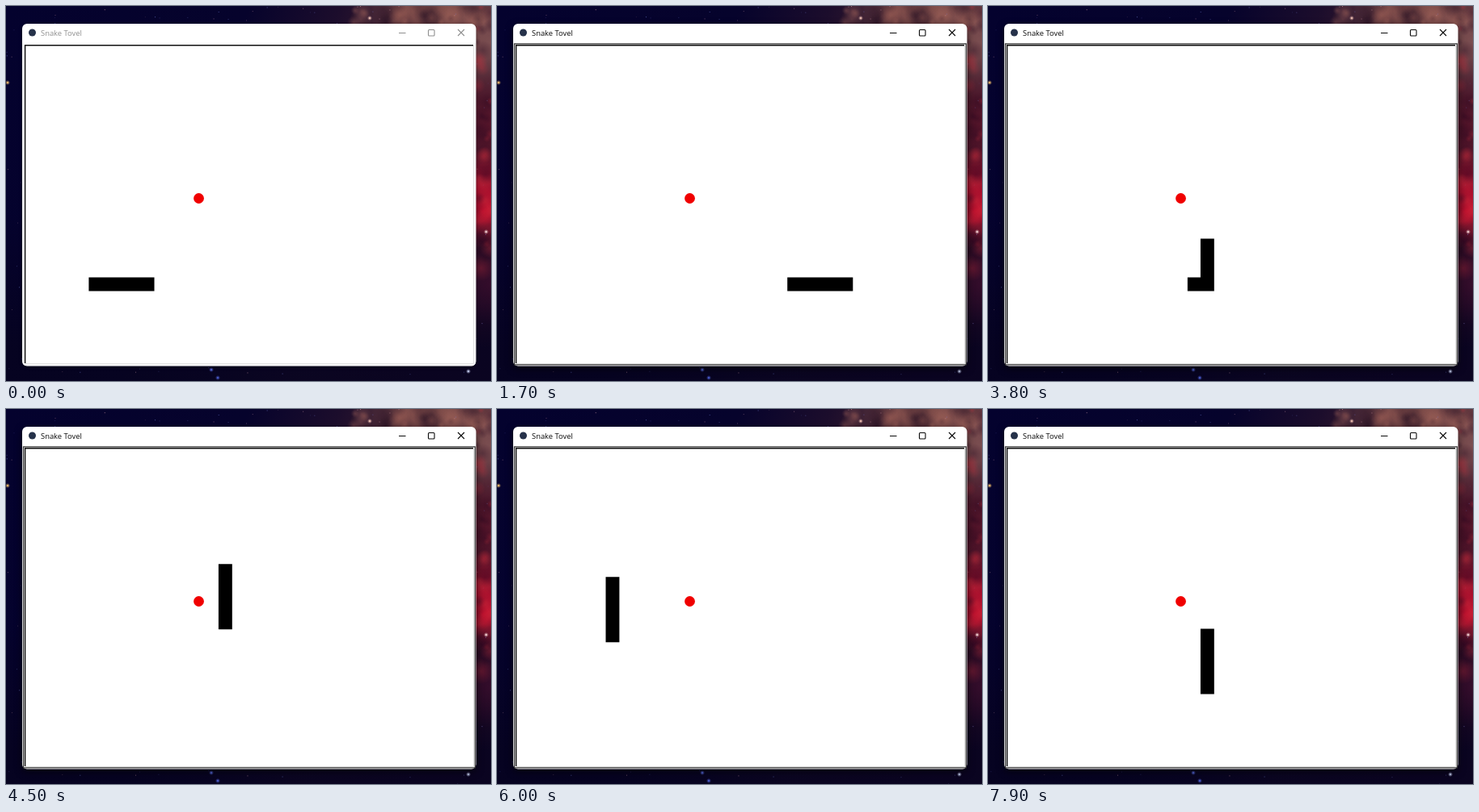
An HTML page with a canvas that plays this animation: 600x465 px, repeating every 8000 ms.

```html
<!DOCTYPE html>
<html lang="en">
<head>
<meta charset="utf-8">
<title>Snake</title>
<style>
  html, body { margin: 0; width: 100%; height: 100%; overflow: hidden; background: #03022c; }
  canvas, svg { position: absolute; left: 0; top: 0; display: block; }
  text { font: 9.4px "Open Sans", "Noto Sans", sans-serif; }
  #win { --ink: #8f8f8f; filter: drop-shadow(0 1px 2px #0006); }
  #win.focused { --ink: #0a0a0a; filter: drop-shadow(0 3px 5px #0009); }
  #focusRing { display: none; }
  .focused #focusRing { display: inline; }
</style>
</head>
<body>
<canvas id="sky" width="600" height="465"></canvas>
<svg width="600" height="465" viewBox="0 0 600 465">
  <g id="win">
    <rect x="20" y="22" width="561.5" height="424.5" rx="6" fill="#fff"/>
    <path d="M20.5 46H581V441q0 5-5 5H25.500q-5 0-5-5z" fill="#f4f4f4"/>
    <rect x="22" y="47" width="558" height="397.500" fill="#fff"/>
    <circle cx="32.500" cy="33" r="4.500" fill="#26324a"/>
    <text x="43" y="36.900" fill="var(--ink)">Snake Tovel</text>
    <g fill="none" stroke="var(--ink)" stroke-width="1.100">
      <path d="M486 33.500h8.500M559 29l8 8m0-8l-8 8"/>
      <rect x="522.500" y="29.500" width="7.500" height="7.500" rx="1"/>
    </g>
    <path d="M578.500 49V443.500H24" fill="none" stroke="#e2e2e2"/>
    <path d="M578 48.800H23.600V443" fill="none" stroke="#111" stroke-width="1.500"/>
    <path id="focusRing" d="M21.500 46.800H580.300V444.900H21.500z" fill="none" stroke="#333" stroke-width="1.200"/>
  </g>
  <circle cx="238.500" cy="238.500" r="6.400" fill="#f00000"/>
  <path id="snake"/>
  <g id="mouse">
    <circle r="23.500" fill="#ff0"/>
    <path d="M.5 .5V12.500L3.300 10l2.200 4.500 2.200-1-2-4.300H9.300z" fill="#24101e" stroke="#53203a" stroke-width=".6"/>
  </g>
</svg>
<script>
const $ = id => document.getElementById(id);
const TICK = 100, LOOP = 8000, LENGTH = 5, COLUMNS = 25, FOCUS_TICK = 12;

function paintSky() {
  const c = $('sky').getContext('2d');
  const glow = (x, y, r, rgb, alpha) => {
    const g = c.createRadialGradient(x, y, 0, x, y, r);
    g.addColorStop(0, `rgba(${rgb},${alpha})`);
    g.addColorStop(1, `rgba(${rgb},0)`);
    c.fillStyle = g;
    c.fillRect(x - r, y - r, 2 * r, 2 * r);
  };
  const base = c.createLinearGradient(0, 0, 600, 200);
  [[0, '#04022e'], [.45, '#06032c'], [.62, '#1c0d2c'], [.78, '#42202f'], [1, '#3a1026']]
    .forEach(([at, color]) => base.addColorStop(at, color));
  c.fillStyle = base;
  c.fillRect(0, 0, 600, 465);
  const depth = c.createLinearGradient(0, 260, 0, 465);
  depth.addColorStop(0, 'rgba(6,3,32,0)');
  depth.addColorStop(.8, 'rgba(6,3,32,.92)');
  c.fillStyle = depth;
  c.fillRect(0, 260, 600, 205);

  let seed = 7;
  const random = () => (seed = seed * 16807 % 2147483647) / 2147483647;
  glow(535, 0, 110, '150,95,85', .75);
  glow(600, 45, 75, '150,105,100', .6);
  glow(592, 150, 70, '120,25,45', .5);
  glow(592, 240, 60, '215,10,45', .85);
  glow(590, 255, 18, '255,20,50', .6);
  glow(600, 345, 50, '70,15,50', .5);
  for (let i = 0; i < 45; i++)
    glow(430 + random() * 170, random() * 22, 4 + random() * 14, i % 2 ? '30,10,30' : '180,110,95', .3);
  for (let i = 0; i < 50; i++)
    glow(582 + random() * 18, random() * 330, 4 + random() * 12, i % 2 ? '35,5,30' : '200,45,60', .3);
  for (let i = 0; i < 420; i++) {
    c.fillStyle = `rgba(${i % 3 ? '120,130,220' : '230,170,180'},${.12 + random() * .5})`;
    c.fillRect(random() * 600, random() * 465, 1, 1);
  }
  [[2, 95, '255,200,110'], [572, 453, '210,220,255'], [254, 451, '90,110,230'],
   [594, 280, '255,225,225'], [450, 15, '255,205,190'], [262, 461, '80,100,220']]
    .forEach(([x, y, rgb]) => { glow(x, y, 3, rgb, .9); glow(x, y, 1.5, rgb, 1); });
}

// Route of the head as legs of [dx, dy, cells]; it wraps at the right edge.
const route = [[0, 0]];
for (const [dx, dy, cells] of [[1, 0, 35], [0, -1, 9], [-1, 0, 8], [0, 1, 9], [1, 0, 8], [0, -1, 9]])
  for (let i = 0; i < cells; i++) {
    const [x, y] = route[route.length - 1];
    route.push([x + dx, y + dy]);
  }

// The game runs a little slower than the clock: ticks without a move.
const pauses = [9, 19, 28, 35, 43, 50, 58, 65, 72, 79];

// Pointer position from tick 8 on.
const pointer = [[515.5, 34.5], [455, 60], [435.7, 71.5], [435.7, 71.5], [435.7, 71.5], [470, 50], [548, 14]];

function draw(tick) {
  const head = LENGTH - 1 + tick - pauses.filter(p => p <= tick).length;
  $('snake').setAttribute('d', route.slice(head - LENGTH + 1, head + 1).map(([x, y]) =>
    `M${102.4 + x % COLUMNS * 16.05} ${336.6 + y * 16.05}h16.9v16.9h-16.9z`).join(''));
  $('win').classList.toggle('focused', tick >= FOCUS_TICK);
  const at = pointer[tick - 8];
  $('mouse').style.display = at ? '' : 'none';
  if (at) $('mouse').setAttribute('transform', `translate(${at})`);
}

function frame() {
  draw(Math.floor(performance.now() % LOOP / TICK));
  requestAnimationFrame(frame);
}

paintSky();
frame();
</script>
</body>
</html>
```
